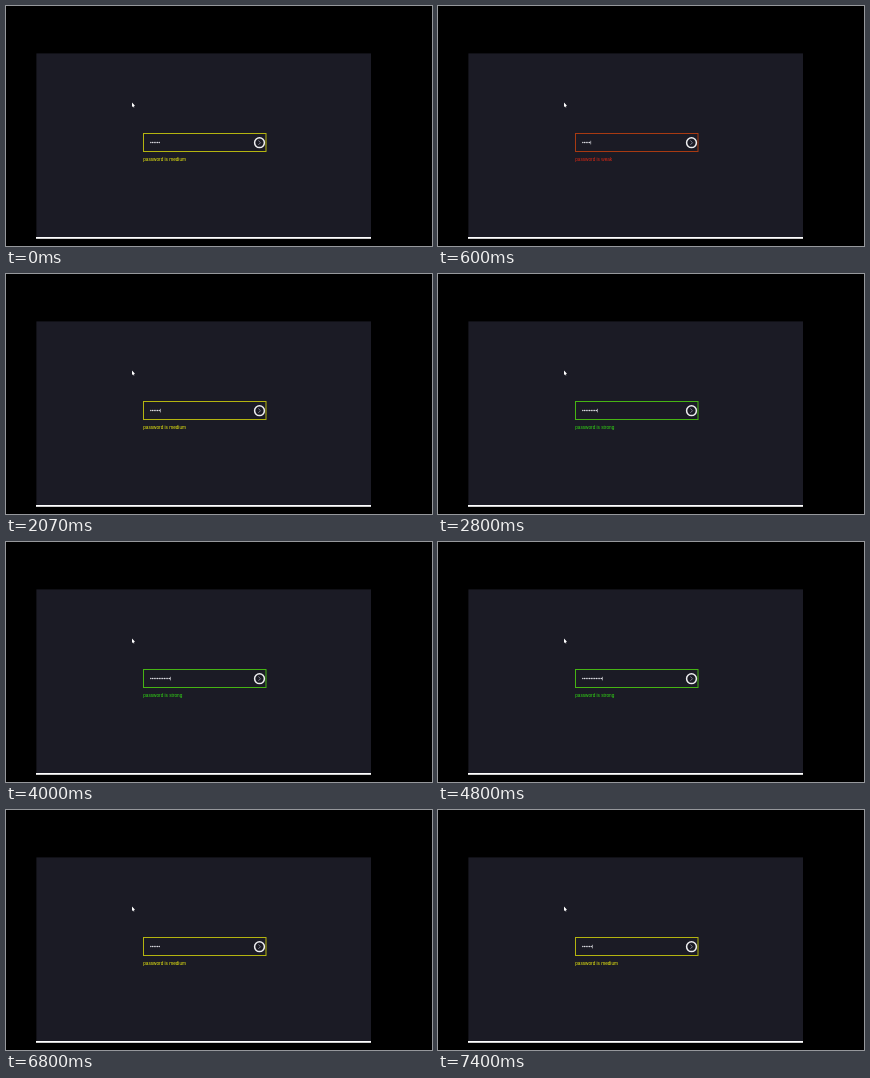
An HTML page with a canvas that plays this animation: 426x240 px, repeating every 7.47 s.

```html
<!DOCTYPE html>
<html lang="en">
<head>
<meta charset="utf-8">
<title>Password strength</title>
<style>
html, body { margin: 0; width: 100%; height: 100%; overflow: hidden; background: #000; }
canvas { display: block; }
</style>
</head>
<body>
<canvas id="stage" width="426" height="240"></canvas>
<script>
const ctx = document.getElementById("stage").getContext("2d");
const LOOP = 7470;
const START = 6;
const PITCH = 1.7;
const BLINK = 530;

// Bursts of typing (+1) and deleting (-1): first key, gap, presses, direction
const bursts = [
  [500, 250, 3, -1],
  [1500, 220, 6, 1],
  [3200, 200, 3, 1],
  [4900, 250, 3, -1],
  [5680, 85, 3, -1]
];
const keys = bursts.flatMap(([first, gap, n, step]) =>
  Array.from({ length: n }, (_, i) => ({ at: first + i * gap, step })));

const levels = {
  weak: { border: "#a83a12", text: "#dc2814" },
  medium: { border: "#b4b410", text: "#f0f010" },
  strong: { border: "#46b414", text: "#32dc14" }
};

function fieldState(t) {
  let count = START;
  let last = keys[keys.length - 1].at - LOOP;
  for (const key of keys) {
    if (key.at > t) break;
    count += key.step;
    last = key.at;
  }
  const level = count < 6 ? "weak" : count < 9 ? "medium" : "strong";
  return { count, level, caret: (t - last) % (2 * BLINK) < BLINK };
}

function line(points, color, width) {
  ctx.beginPath();
  points.forEach(([x, y]) => ctx.lineTo(x, y));
  ctx.strokeStyle = color;
  ctx.lineWidth = width;
  ctx.stroke();
}

function drawPanel() {
  ctx.fillStyle = "#000";
  ctx.fillRect(0, 0, 426, 240);
  ctx.fillStyle = "#1b1b25";
  ctx.fillRect(30.4, 47.4, 334.6, 184);
  ctx.fillStyle = "#fff";
  ctx.fillRect(30, 231, 335, 1.8);
}

function drawPointer() {
  ctx.beginPath();
  [[126, 96.5], [126, 101], [127, 100.2], [127.8, 101.6], [128.4, 101.2],
   [127.9, 99.9], [129, 99.7]].forEach(([x, y]) => ctx.lineTo(x, y));
  ctx.closePath();
  ctx.fillStyle = "#fff";
  ctx.fill();
}

function drawButton() {
  ctx.beginPath();
  ctx.arc(253.5, 136.7, 4.9, 0, 2 * Math.PI);
  ctx.strokeStyle = "#eeeef0";
  ctx.lineWidth = 1.5;
  ctx.stroke();
  line([[252.4, 134.6], [254.5, 136.7], [252.4, 138.8]], "#9a9aaa", 0.8);
}

function drawField({ count, level, caret }) {
  const { border, text } = levels[level];
  ctx.strokeStyle = border;
  ctx.lineWidth = 1;
  ctx.strokeRect(137.5, 127.5, 122.5, 18);

  ctx.fillStyle = "#dcdce2";
  for (let i = 0; i < count; i++) {
    ctx.beginPath();
    ctx.arc(144.8 + i * PITCH, 136.5, 0.72, 0, 2 * Math.PI);
    ctx.fill();
  }
  if (caret) ctx.fillRect(144 + count * PITCH, 134.8, 0.6, 3.6);

  ctx.font = "4.7px 'Liberation Sans', Arial, sans-serif";
  ctx.fillStyle = text;
  ctx.fillText("password is " + level, 137.2, 154.5);
}

function draw(now) {
  drawPanel();
  drawPointer();
  drawField(fieldState(now % LOOP));
  drawButton();
}

const begin = performance.now();
function tick() {
  draw(performance.now() - begin);
  requestAnimationFrame(tick);
}
tick();
</script>
</body>
</html>
```
